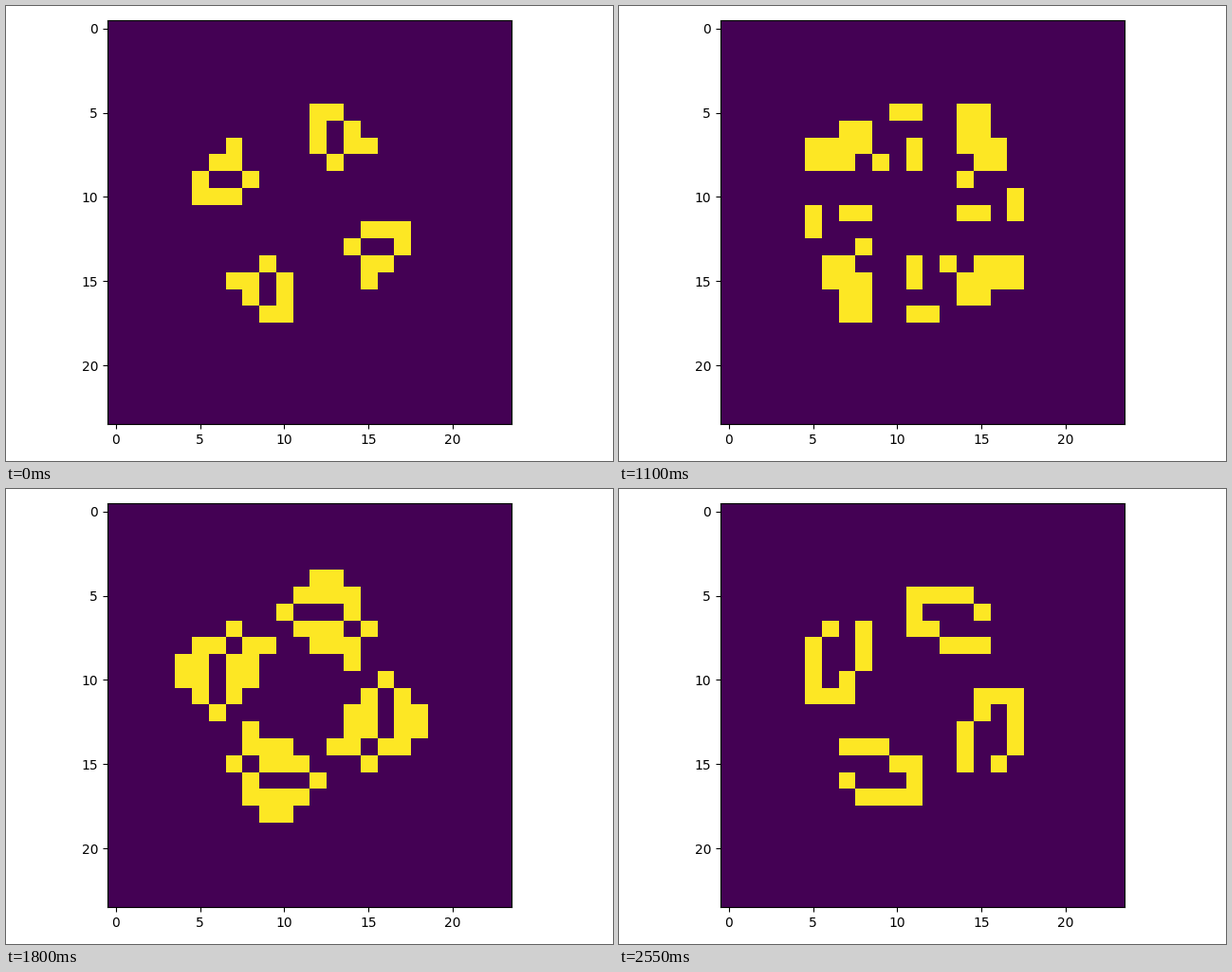
These frames come from a looping animation (640x480 px, 2.6 s). A matplotlib script:

```python
import numpy as np
import matplotlib.pyplot as plt
from matplotlib.animation import FuncAnimation

SIZE = 24
CENTRE = 11
FRAMES = 52
INTERVAL = 50  # ms

# One arm of the oscillator as (column, row); the others are quarter turns of it.
ARM = [(12, 5), (13, 5), (12, 6), (14, 6), (12, 7), (14, 7), (15, 7), (13, 8)]


def seed_grid():
    grid = np.zeros((SIZE, SIZE), dtype=int)
    cells = ARM
    for _ in range(4):
        for col, row in cells:
            grid[row, col] = 1
        cells = [(2 * CENTRE - row, col) for col, row in cells]
    return grid


def life_step(grid):
    near = sum(
        np.roll(grid, (dy, dx), axis=(0, 1))
        for dy in (-1, 0, 1)
        for dx in (-1, 0, 1)
        if (dy, dx) != (0, 0)
    )
    return ((near == 3) | ((grid == 1) & (near == 2))).astype(int)


# The seed is held for two ticks before the rule starts.
states = [seed_grid()] * 2
while len(states) < FRAMES:
    states.append(life_step(states[-1]))

fig, ax = plt.subplots(figsize=(6.4, 4.8), dpi=100)
image = ax.imshow(states[0], cmap="viridis", vmin=0, vmax=1, interpolation="nearest")
fig.tight_layout()


def draw(i):
    image.set_data(states[i])
    return (image,)


anim = FuncAnimation(fig, draw, frames=FRAMES, interval=INTERVAL, repeat=True, repeat_delay=0)
plt.show()
```
